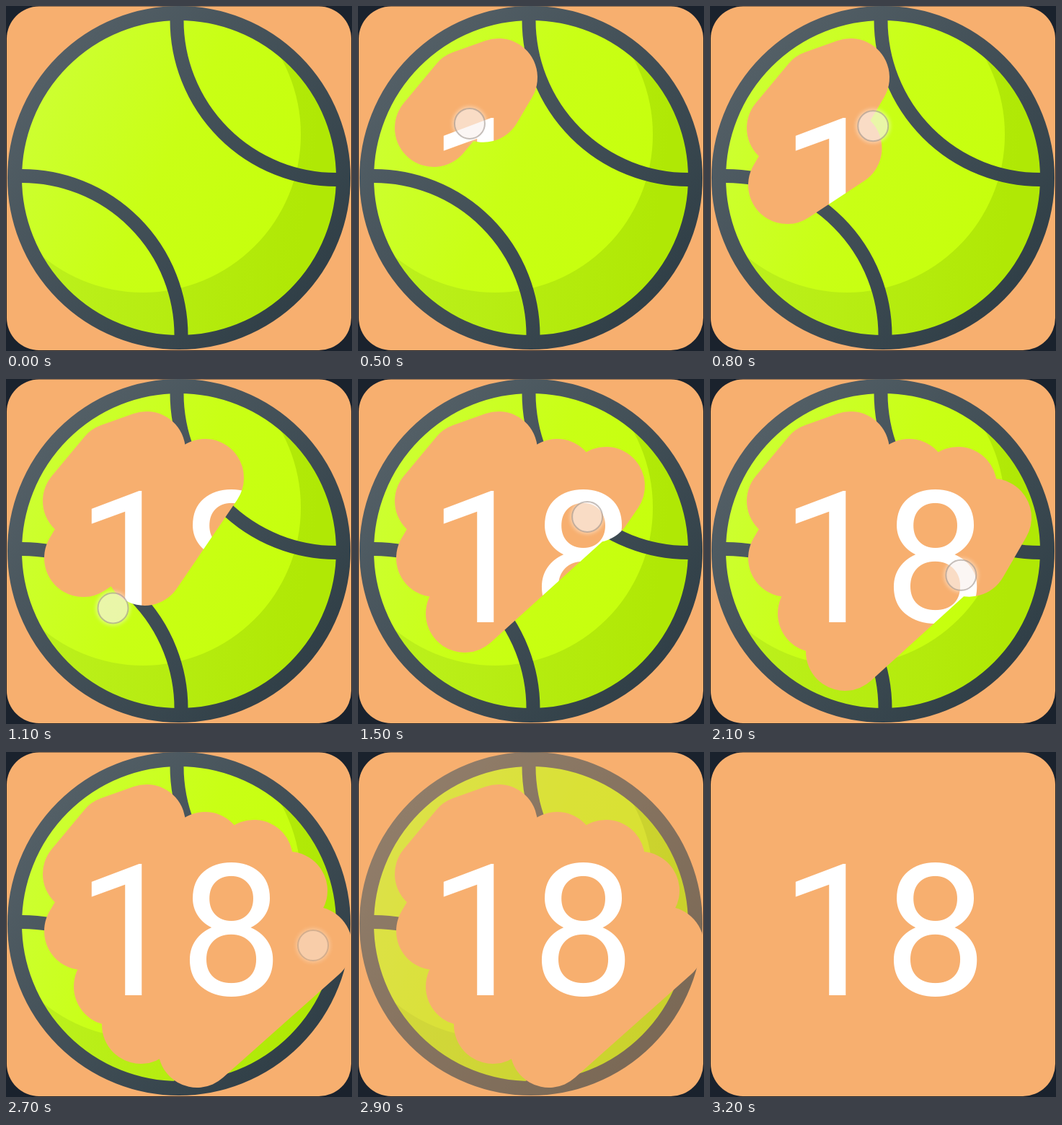
These frames come from a looping animation (480x478 px, 3.3 s). An HTML page:

```html
<!DOCTYPE html>
<html lang="en">
<head>
<meta charset="utf-8">
<title>Scratch card</title>
<style>
  html, body { margin: 0; width: 100%; height: 100%; overflow: hidden; background: #1a222d; }
  svg { display: block; }
  text { font: 400 255px Roboto, Arial, sans-serif; fill: #fff; }
</style>
</head>
<body>
<svg width="480" height="478" viewBox="0 0 480 478">
  <defs>
    <linearGradient id="dark" gradientUnits="userSpaceOnUse" x1="60" y1="80" x2="420" y2="400">
      <stop stop-color="#535f66"/>
      <stop offset="1" stop-color="#303f47"/>
    </linearGradient>
    <linearGradient id="lime" gradientUnits="userSpaceOnUse" x1="30" y1="140" x2="400" y2="320">
      <stop stop-color="#cdff32"/>
      <stop offset=".5" stop-color="#c9ff15"/>
      <stop offset="1" stop-color="#c6ff0c"/>
    </linearGradient>
    <linearGradient id="shade" gradientUnits="userSpaceOnUse" x1="60" y1="350" x2="400" y2="400">
      <stop stop-color="#bcf01c"/>
      <stop offset="1" stop-color="#b0e805"/>
    </linearGradient>
    <clipPath id="inside"><circle cx="240" cy="238" r="228"/></clipPath>
    <mask id="uncovered" maskUnits="userSpaceOnUse" x="0" y="0" width="480" height="478">
      <rect width="480" height="478" fill="#fff"/>
      <polyline id="scratch" fill="none" stroke="#000" stroke-width="108"
        stroke-linecap="round" stroke-linejoin="round"/>
    </mask>
    <filter id="blur" x="-50%" y="-50%" width="200%" height="200%"><feGaussianBlur stdDeviation="2.5"/></filter>
  </defs>

  <rect x="1" y=".5" width="478" height="476.5" rx="45" fill="#f7af6f"/>
  <text x="97.6" y="337">18</text>

  <g id="cover" mask="url(#uncovered)">
    <g clip-path="url(#inside)">
      <circle cx="240" cy="238" r="228" fill="url(#shade)"/>
      <circle cx="190" cy="178" r="219" fill="url(#lime)"/>
      <g fill="none" stroke="url(#dark)" stroke-width="19">
        <circle cx="458" cy="19.5" r="221"/>
        <circle cx="22" cy="456.5" r="221"/>
      </g>
    </g>
    <circle cx="240" cy="238" r="228" fill="none" stroke="url(#dark)" stroke-width="20"/>
  </g>

  <g id="finger">
    <circle r="24" fill="#fff" opacity=".4" filter="url(#blur)"/>
    <circle r="21" fill="#f6ece6" fill-opacity=".45" stroke="#a0978f" stroke-opacity=".6" stroke-width="2"/>
  </g>
</svg>
<script>
const LOOP = 3300, STEP = 100, LEAD = 45, OVERSHOOT = 0.2;
const [scratch, cover, finger] = ['scratch', 'cover', 'finger'].map(id => document.getElementById(id));

// Turning points of the stroke: time, x, y
const stroke = [
  [180, 105, 169], [320, 150, 115], [440, 195, 99], [690, 107, 248], [930, 276, 137], [1190, 148, 325],
  [1470, 344, 148], [1750, 187, 378], [2025, 392, 192], [2320, 265, 411], [2620, 426, 268]
];

// The finger swings a little wider than the mark it leaves
const swing = stroke.map(([t, ...p], i) => {
  const a = stroke[i - 1], b = stroke[i + 1];
  return a && b
    ? [t, ...p.map((v, k) => v + OVERSHOOT * (v - (a[k + 1] + b[k + 1]) / 2))]
    : [t, ...p];
});

const clamp = v => Math.min(1, Math.max(0, v));

function pointAt(path, t) {
  const i = Math.max(1, path.findIndex(p => p[0] > t));
  const past = t >= path.at(-1)[0];
  const [a, b] = past ? path.slice(-2) : [path[i - 1], path[i]];
  const u = clamp((t - a[0]) / (b[0] - a[0]));
  return [a[1] + (b[1] - a[1]) * u, a[2] + (b[2] - a[2]) * u];
}

function draw(t) {
  const done = stroke.filter(p => p[0] <= t).map(p => p.slice(1));
  scratch.setAttribute('points', done.length ? [...done, pointAt(stroke, t)].join(' ') : '');
  cover.setAttribute('opacity', clamp((3150 - t) / 400));
  finger.setAttribute('transform', `translate(${pointAt(swing, t + LEAD)})`);
  finger.setAttribute('opacity', t < 100 ? 0 : clamp((2850 - t) / 220));
}

const start = performance.now();
function tick() {
  const t = (performance.now() - start) % LOOP;
  draw(Math.floor(t / STEP) * STEP);
  requestAnimationFrame(tick);
}
tick();
</script>
</body>
</html>
```
